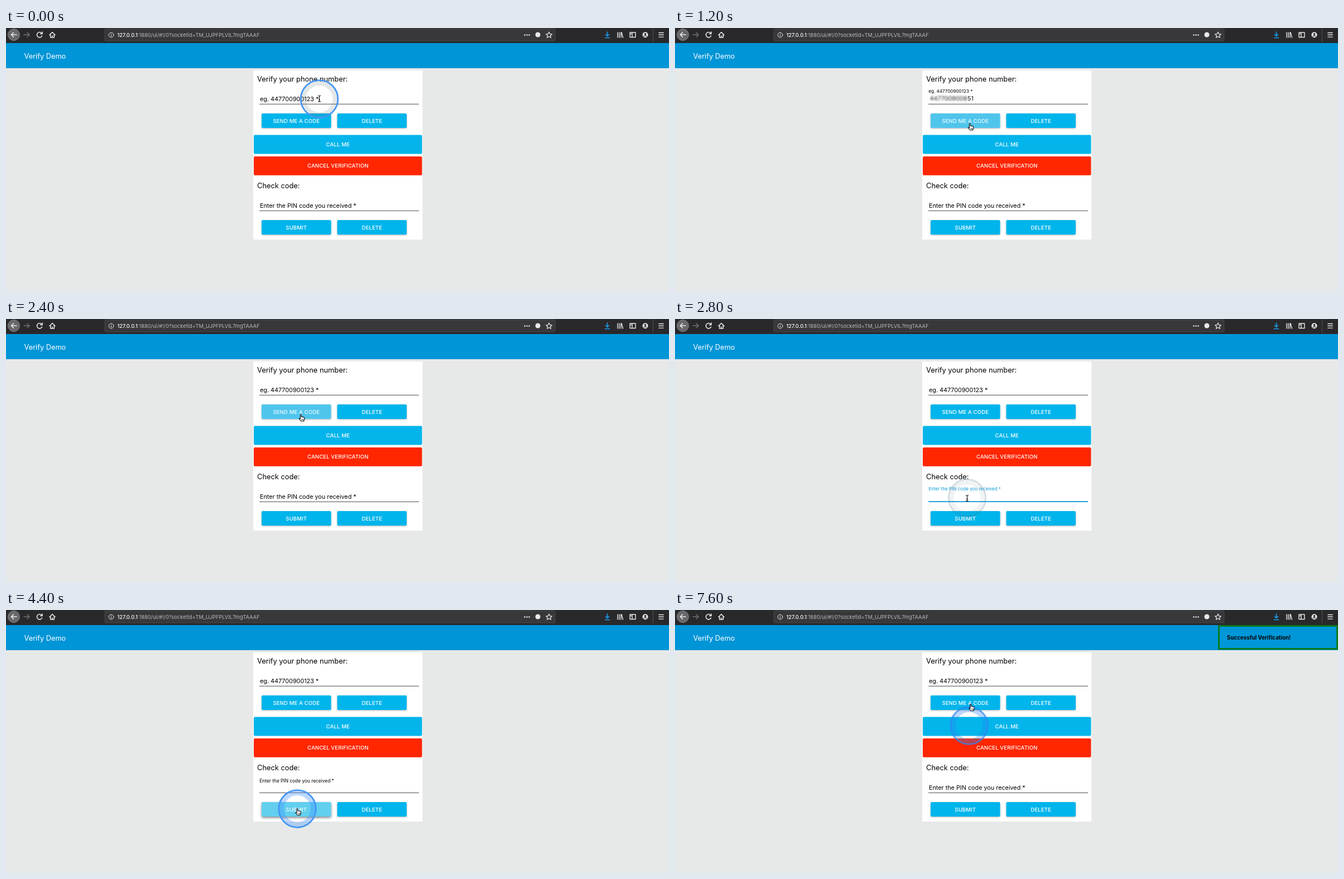
These frames come from a looping animation (1188 px wide and 471 px high, 8000 ms). An HTML page:

```html
<!DOCTYPE html>
<html lang="en">
<head>
<meta charset="utf-8">
<title>Verify Demo</title>
<style>
html, body { margin: 0; width: 100%; height: 100%; overflow: hidden; background: #e7e9e8; }
svg { display: block; width: 1188px; height: 471px; font-family: Inter, "Open Sans", sans-serif; }
text { white-space: pre; }
.icon { fill: none; stroke: #e9e9ea; stroke-width: 1.4; stroke-linecap: round; stroke-linejoin: round; }
</style>
</head>
<body>
<svg viewBox="0 0 1188 471">
  <defs>
    <filter id="shadow" x="-10%" y="-30%" width="120%" height="170%">
      <feDropShadow dx="0" dy="1" stdDeviation="1.4" flood-color="#000" flood-opacity=".3"/>
    </filter>
    <filter id="lifted" x="-10%" y="-30%" width="120%" height="180%">
      <feDropShadow dx="0" dy="2" stdDeviation="2" flood-color="#000" flood-opacity=".5"/>
    </filter>
    <filter id="blur" x="-10%" y="-30%" width="120%" height="160%"><feGaussianBlur stdDeviation="1.5"/></filter>
  </defs>
  <rect width="1188" height="471" fill="#e7e9e8"/>
  <rect width="1188" height="27" fill="#29292b"/>
  <rect x="177" y="1.5" width="807" height="21.5" rx="2" fill="#38383b" stroke="#505053" stroke-width=".8"/>
  <circle cx="14" cy="12" r="10.5" fill="#68686b" stroke="#8b8b8e" stroke-width=".8"/>
  <g class="icon">
    <path d="M19 12H9.5M13.5 8L9.5 12L13.5 16" stroke-width="1.7"/>
    <path d="M32 12H42M38 8L42 12L38 16" stroke="#737376"/>
    <path d="M64 9.5A4.7 4.7 0 1 0 64.5 14M65 7V10.5H61.5" stroke-width="1.6"/>
    <path d="M78 12.5L83 7.5L88 12.5M79.7 12V17H86.3V12M83 17V14" stroke-width="1.6"/>
    <g stroke-width="1"><circle cx="188.500" cy="12.500" r="4.300"/><path d="M188.500 12V14.700M188.500 10.200V10.300"/></g>
    <path d="M973 7L974.6 10.6L978.4 11L975.5 13.500L976.4 17.300L973 15.300L969.6 17.300L970.5 13.500L967.6 11L971.400 10.600Z" stroke-width="1.200"/>
    <path d="M1077.500 7V14M1074.500 11.500L1077.500 14.500L1080.500 11.500M1073.500 17.500H1081.500" stroke="#19a0f0" stroke-width="1.600"/>
    <path d="M1096 8V17M1099 8V17M1102 8V17M1103 8L1105.500 17"/>
    <path d="M1118 8H1128V16.500H1118ZM1122 8V16.500M1119.500 10.500H1120.500"/>
    <path d="M1169.800 8.500H1178.200M1169.800 12.300H1178.200M1169.800 16.100H1178.200"/>
  </g>
  <g fill="#e9e9ea">
    <circle cx="929.500" cy="12.500" r="1.300"/><circle cx="933.500" cy="12.500" r="1.300"/><circle cx="937.500" cy="12.500" r="1.300"/>
    <circle cx="953" cy="12" r="4.500"/>
    <circle cx="1145.500" cy="12.300" r="5"/>
  </g>
  <circle cx="1145.500" cy="10.800" r="1.900" fill="#29292b"/>
  <path d="M1142.500 15Q1145.500 12.800 1148.500 15" fill="none" stroke="#29292b" stroke-width="1.200"/>
  <path d="M1159.500 0V25" stroke="#505053"/>
  <text x="199.500" y="15.700" font-size="9.300" fill="#bababd"><tspan fill="#fff" font-weight="500">127.0.0.1</tspan>:1880/ui/#!/0?socketid=TM_UJPFPLVIL7mgTAAAF</text>
  <rect y="27" width="1188" height="45" fill="#0095d7"/>
  <text x="32.500" y="54.700" font-size="12.800" fill="#fff">Verify Demo</text>
  <rect x="443" y="76" width="303.300" height="302.800" fill="#fff"/>
  <g id="view"></g>
</svg>
<script>
const STEP = 400, LOOP = 8000;
const BLUE = '#04b5eb', ACCENT = '#0d9bd8';
const view = document.getElementById('view');

const text = (x, y, size, content, extra = '') =>
  `<text x="${x}" y="${y}" font-size="${size}" ${extra}>${content}</text>`;

function button(x, y, w, h, label, { fill = BLUE, filter = '', ink = '#fff' } = {}) {
  return `<rect x="${x}" y="${y}" width="${w}" height="${h}" rx="2" fill="${fill}" ${filter && `filter="url(#${filter})"`}/>` +
    text(x + w / 2, y + h / 2 + 3.5, 9.6, label,
      `fill="${ink}" font-weight="500" letter-spacing=".1" text-anchor="middle"`);
}

// Label poses: rest inside the field, drop on its way back, float above it.
const POSES = { rest: [455, 131.4, 10.8], drop: [454.3, 117.6, 8.35], float: [454.3, 116, 8.1] };

function form(top, title, hint, action, { pose = 'rest', focus, value = '', hover }) {
  const [x, y, size] = POSES[pose];
  const look = hover ? { fill: hover, filter: hover === '#62cfef' ? 'lifted' : 'shadow', ink: '#eefaff' } : { filter: 'shadow' };
  return `<g transform="translate(0 ${top})">` +
    text(450, 96, 12.85, title) +
    text(x, y, size, hint + ' *', `fill="${focus ? ACCENT : '#000'}"`) +
    value +
    `<rect x="454" y="${focus ? 135.2 : 135.8}" width="286" height="${focus ? 1.8 : 1}" fill="${focus ? ACCENT : '#4a4a4a'}"/>` +
    button(458, 153, 124.5, 26, action, look) +
    button(593.5, 153, 124.5, 26, 'DELETE', { filter: 'shadow' }) + '</g>';
}

// Click halo: ring colour, ring opacity, band colour.
const HALOS = {
  press: ['#4697f2', 1, 'rgba(60,140,255,.33)'],
  settle: ['#4697f2', 1, 'rgba(70,95,100,.15)'],
  fade: ['#3f8fe8', .45, 'rgba(60,110,160,.14)'],
  ghost: ['#54748c', .22, 'rgba(70,100,110,.08)'],
  start: ['#2e86f0', .75, 'rgba(40,125,245,.3)']
};
function halo([x, y, kind]) {
  const [color, opacity, band] = HALOS[kind];
  return `<g transform="translate(${x} ${y})" fill="none">
    <circle r="28.5" stroke="${band}" stroke-width="9"/>
    <circle r="33.300" stroke="${color}" stroke-width="2.800" opacity="${opacity}"/></g>`;
}

const POINTERS = {
  beam: `<path d="M-2.500 -5.500Q0 -5.500 0 -3.500Q0 -5.500 2.500 -5.500M0 -4V4M-2.500 5.500Q0 5.500 0 3.500Q0 5.500 2.500 5.500M-1.500 1.500H1.500" fill="none" stroke="#111" stroke-width="1.100"/>`,
  hand: `<path d="M-2.500 1V-5.200Q-1.600 -6.700 -.700 -5.200V-1.700Q.500 -2.600 1.300 -1.400Q2.500 -2 3.100 -.900Q4.500 -1.200 4.700 .300V2.500L3.600 6H-1.300L-4.700 1.700Q-4.700 .200 -2.500 1.700Z" fill="#fff" stroke="#111" stroke-width="1.100" stroke-linejoin="round"/>
    <path d="M-.2 2V4.500M1.500 2V4.500M3 2V4.500" stroke="#111" stroke-width=".7"/>`
};
const pointer = ([x, y, kind]) => `<g transform="translate(${x} ${y})">${POINTERS[kind]}</g>`;

const phone = `<g fill="#222">${text(456.500, 130.400, 10.8, '4477009008', 'filter="url(#blur)"')}${text(524, 130.400, 10.8, '51')}</g>`;
const pin = digits => text(455, 130.800, 10.8, digits);
const filled = { pose: 'float', value: phone };
const sendHover = '#50c5ec', submitHover = '#53c8ee';
const onSend = [530, 177, 'hand'], onSubmit = [523.500, 361.500, 'hand'], inPin = [523.500, 321, 'beam'];

// Each scene holds from its start time until the next one.
const scenes = [
  { at: 0, ring: [561.500, 127, 'settle'], cursor: [561.500, 126.500, 'beam'] },
  { at: 400, top: { pose: 'float', focus: true }, cursor: [561.500, 126.500, 'beam'] },
  { at: 800, top: filled, ring: [565, 115.500, 'press'], cursor: [557.500, 126.500, 'beam'] },
  { at: 1200, top: { ...filled, hover: sendHover }, cursor: onSend },
  { at: 1600, top: { pose: 'drop', hover: '#62cfef' }, ring: [528.500, 172, 'press'], cursor: onSend },
  { at: 2000, top: { hover: sendHover }, ring: [528.500, 172, 'fade'], cursor: onSend },
  { at: 2400, top: { hover: sendHover }, cursor: onSend },
  { at: 2800, low: { pose: 'float', focus: true }, ring: [523.500, 320.500, 'ghost'], cursor: inPin },
  { at: 3200, low: { pose: 'float', focus: true, value: pin('52') }, cursor: inPin },
  { at: 3600, low: { pose: 'float', focus: true, value: pin('5274') }, cursor: inPin },
  { at: 4000, low: { pose: 'float', focus: true, value: pin('5274'), hover: submitHover }, ring: [522, 356, 'start'], cursor: onSubmit },
  { at: 4400, low: { pose: 'drop', hover: '#62cfef' }, ring: [522, 356, 'press'], cursor: onSubmit },
  { at: 4800, low: { hover: submitHover }, ring: [522, 356, 'fade'], cursor: onSubmit, toast: true },
  { at: 5200, low: { hover: submitHover }, cursor: onSubmit, toast: true },
  { at: 7600, ring: [527, 207, 'start'], cursor: [531.500, 174.500, 'hand'], toast: true }
];

const toast = `<rect x="974.500" y="28.500" width="212" height="41" fill="#0097d8" stroke="#087a20" stroke-width="3"/>` +
  text(989, 52.600, 9.75, 'Successful Verification!', 'font-weight="700"');

function draw(scene) {
  view.innerHTML =
    form(0, 'Verify your phone number:', 'eg. 447700900123', 'SEND ME A CODE', scene.top || {}) +
    button(444, 191.500, 301.500, 34, 'CALL ME') +
    button(444, 230, 301.500, 33.700, 'CANCEL VERIFICATION', { fill: '#ff2600' }) +
    form(191, 'Check code:', 'Enter the PIN code you received', 'SUBMIT', scene.low || {}) +
    (scene.toast ? toast : '') +
    (scene.ring ? halo(scene.ring) : '') +
    pointer(scene.cursor);
}

let shown;
const start = performance.now();
function tick() {
  const time = Math.floor((performance.now() - start) % LOOP / STEP) * STEP;
  const scene = scenes.findLast(s => s.at <= time);
  if (scene !== shown) draw(shown = scene);
  requestAnimationFrame(tick);
}
tick();
</script>
</body>
</html>
```
